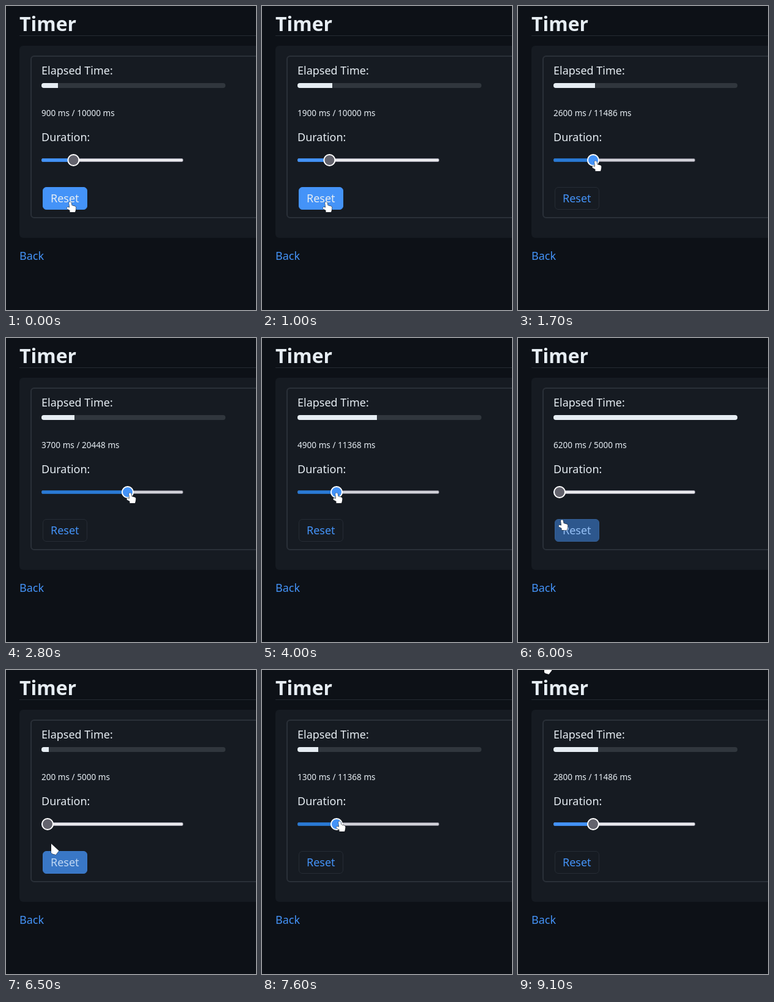
Write an HTML page that moves like this. It is 409 px wide and 497 px high and loops after 9.2 s.

```html
<!DOCTYPE html>
<html lang="en">
<head>
<meta charset="utf-8">
<title>Timer</title>
<style>
  html, body { margin: 0; width: 100%; height: 100%; overflow: hidden; background: #0d1117; }
  svg { display: block; width: 409px; height: 497px; font: 18px "Noto Sans", sans-serif; fill: #e6edf3; }
  .title { font-size: 32px; font-weight: 700; }
  .small { font-size: 13.6px; }
  .link { fill: #4493f8; }
  .cursor { fill: #fff; stroke: #10141a; stroke-width: 1; paint-order: stroke; stroke-linejoin: round; }
  #rail { fill: #e9e9ed; stroke: #8f8f9d; }
  #fill { fill: #4493f8; stroke: #3a82dd; }
  #thumb { fill: #63636d; stroke: #fff; stroke-width: 2; }
  .active #rail { fill: #d0d0d7; stroke: #676774; }
  .active #fill { fill: #2a7ad5; stroke: #2468b6; }
  .active #thumb { fill: #4493f8; }
</style>
</head>
<body>
<svg viewBox="0 0 409 497">
  <clipPath id="round"><rect x="58" y="126" width="301" height="8" rx="4"/></clipPath>
  <rect width="409" height="497" fill="#0d1117"/>
  <text class="title" x="22" y="41">Timer</text>
  <rect x="22" y="48" width="387" height="1" fill="#252b32"/>
  <rect x="22" y="65" width="420" height="314" rx="6" fill="#161b22"/>
  <rect x="41" y="82" width="420" height="264" rx="5" fill="none" stroke="#2a3038" stroke-width="2"/>

  <text x="58" y="112">Elapsed Time:</text>
  <g clip-path="url(#round)">
    <rect x="58" y="126" width="301" height="8" fill="#30363d"/>
    <rect id="bar" x="58" y="126" height="8" fill="#e6edf3"/>
  </g>
  <text id="label" class="small" x="58" y="180"></text>

  <text x="58" y="221">Duration:</text>
  <g id="slider">
    <rect id="rail" x="58.5" y="249.5" width="231" height="5" rx="2"/>
    <rect id="fill" x="58.5" y="249.5" height="5" rx="2"/>
    <circle id="thumb" cy="252" r="9"/>
  </g>

  <rect id="button" x="60.5" y="296.5" width="72" height="36" rx="5.5"/>
  <text id="reset" x="73" y="321">Reset</text>
  <text class="link" x="22" y="415">Back</text>

  <path id="hand" class="cursor" d="M-2 1.4Q0 -.6 1.7 1.2L2.7 6L8 7.4Q9.6 8 9.4 10L9 13.5L8 17H-.5V14L-5.2 11.4Q-6 9.6-4.4 8.8L-1 9.5Z"/>
  <path id="arrow" class="cursor" d="M0 0L12.5 11.5L7.5 18L2 16.5L0 15Z"/>
</svg>
<script>
const LOOP = 9200, TICK = 100;
const MIN = 5000, SPAN = 25000, TRAVEL = 212, START = 42.4;
const RESET = 6300, EXPIRED = 6200;

const el = {};
for (const node of document.querySelectorAll("svg [id]")) el[node.id] = node;

const set = (node, attrs) => {
  for (const name in attrs) node.setAttribute(name, attrs[name]);
};
const mix = (a, b, k) => `rgb(${a.map((v, i) => Math.round(v + (b[i] - v) * k))})`;

function draw(t) {
  // Eased 0 to 1 between two times.
  const ease = (from, to) => {
    const p = Math.min(1, Math.max(0, (t - from) / (to - from)));
    return p * p * (3 - 2 * p);
  };

  // Drag right, back, far right, to the minimum; after the reset, right again.
  const dragged = START + (135 - START) * ease(1300, 3000) - 81 * ease(3000, 4000)
    + 155 * ease(4000, 4500) - 209 * ease(4500, 5325)
    + 54 * ease(6700, 7600) + ease(7700, 7800);
  const offset = t < 1400 ? START : Math.round(dragged);
  const duration = Math.round(MIN + offset * SPAN / TRAVEL);
  const elapsed = t < RESET ? Math.min(900 + t, EXPIRED) : t - RESET;
  set(el.bar, { width: Math.round(301 * Math.min(1, elapsed / duration)) });
  el.label.textContent = `${elapsed} ms / ${duration} ms`;

  const active = (t >= 1400 && t < 5800) || (t >= 6700 && t < 7900);
  el.slider.classList.toggle("active", active);
  set(el.fill, { width: offset + 9 });
  set(el.thumb, { cx: 68 + offset });

  const hover = 1 - ease(1100, 1300) + ease(5900, 6100) - ease(6400, 6720);
  const blue = [68, 147, 248];
  set(el.button, {
    fill: mix([22, 27, 34], blue, hover),
    stroke: mix([38, 44, 52], blue, hover)
  });
  set(el.reset, { fill: mix(blue, [230, 237, 243], hover) });

  // The pointer follows the thumb with a drifting grip, and leaves at the top.
  const grip = -5 + 9 * ease(1050, 1400) - 4 * ease(3000, 4000) + 2 * ease(4000, 4500)
    + 4 * ease(5700, 6250) - ease(6700, 7600);
  const leave = ease(7800, 8650);
  const x = Math.round(68 + offset + grip - 85 * leave);
  const y = Math.round(320 - 67 * ease(1050, 1400) + 5 * ease(4000, 4500)
    + 69 * ease(5700, 6250) - 80 * ease(RESET, 6680) - 258 * leave);
  const pointing = active || y >= 296;
  const transform = `translate(${x} ${y})`;
  set(el.hand, { transform, visibility: pointing ? "visible" : "hidden" });
  set(el.arrow, { transform, visibility: pointing ? "hidden" : "visible" });
}

function tick() {
  draw(Math.floor(performance.now() % LOOP / TICK) * TICK);
  requestAnimationFrame(tick);
}
tick();
</script>
</body>
</html>
```
